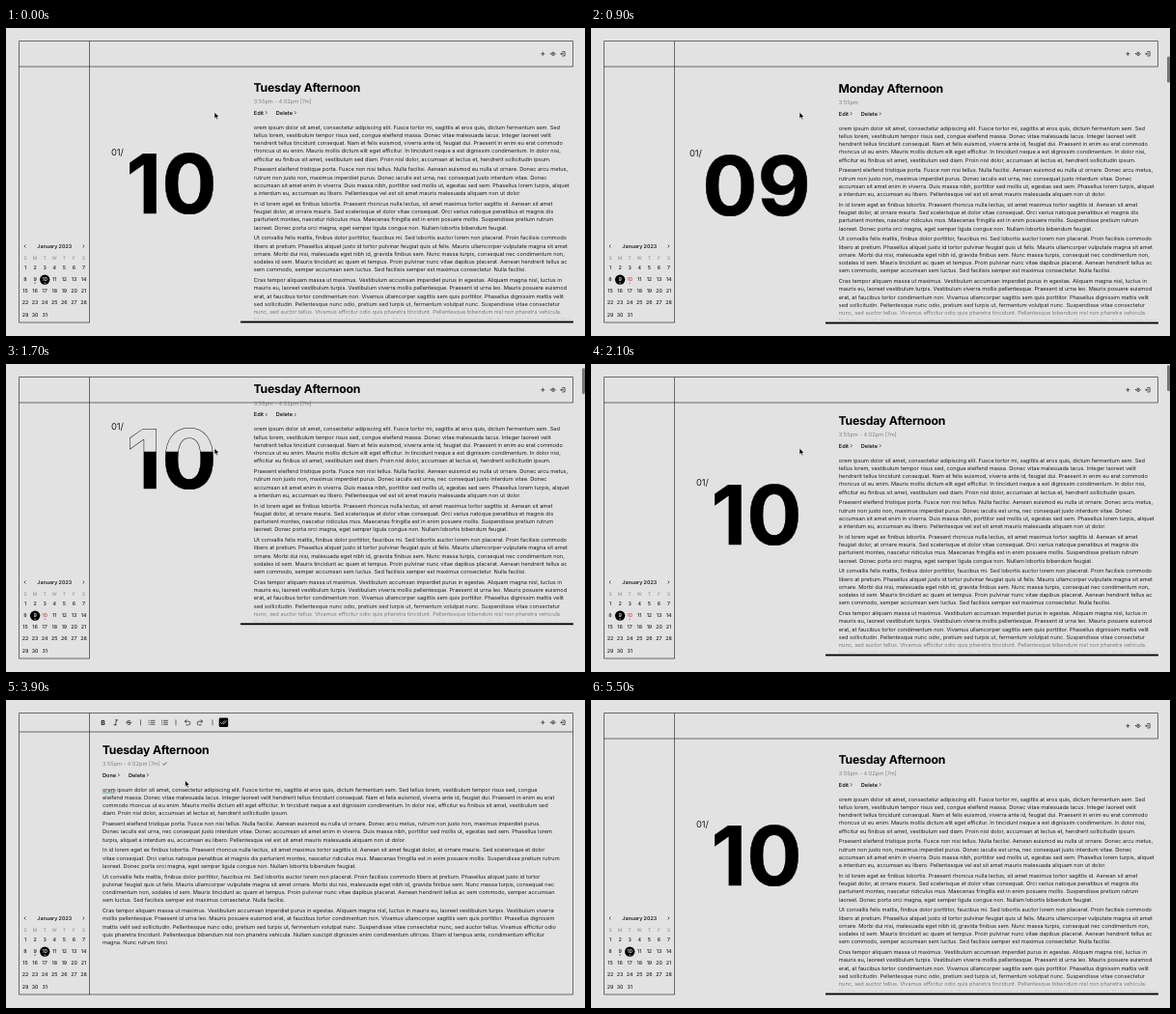
These frames come from a looping animation (600x319 px, 6.2 s). An HTML page:

```html
<!DOCTYPE html>
<html lang="en">
<head>
<meta charset="utf-8">
<title>Journal</title>
<style>
  html, body { margin: 0; width: 100%; height: 100%; overflow: hidden; background: #e2e2e2; }
  svg { display: block; width: 100%; height: 100%; }
  text { font-family: Inter, "Liberation Sans", sans-serif; font-size: 5.61px; fill: #1c1c1c;
         font-optical-sizing: none; text-rendering: geometricPrecision; white-space: pre; }
  .title { font-size: 12.2px; font-weight: 700; letter-spacing: -.015em; fill: #000; }
  .meta { font-size: 5.7px; font-weight: 300; fill: #666; }
  .action { font-weight: 500; fill: #000; }
  .big { font-size: 85px; font-weight: 700; text-anchor: middle; fill: #000; }
  .big.hollow { fill: none; stroke: #111; stroke-width: .5; }
  .month { font-size: 9.4px; text-anchor: end; }
  .cal { font-size: 5.3px; font-weight: 500; text-anchor: middle; }
  .cal.head { font-size: 5.3px; font-weight: 600; }
  .cal.week { font-size: 5px; font-weight: 400; fill: #888; }
  .line { fill: none; stroke: #2a2a2a; stroke-width: .65; }
  .icon { fill: none; stroke: #111; stroke-width: .65; stroke-linecap: round; stroke-linejoin: round; }
  .pointer { fill: #000; stroke: #fff; stroke-width: .6; stroke-linejoin: round; }
</style>
</head>
<body>
<svg id="stage" viewBox="0 0 600 319" xmlns="http://www.w3.org/2000/svg">
  <defs>
    <linearGradient id="fade" x2="0" y2="1">
      <stop offset="0" stop-color="#e2e2e2" stop-opacity="0"/>
      <stop offset="1" stop-color="#e2e2e2"/>
    </linearGradient>
  </defs>
  <g id="reader"><g id="feed"></g></g>
  <g id="editor"></g>
  <g id="frame">
    <path class="line" d="M13.5 305V13.5H587.5V33M86.5 13.5V305M13.5 305H87"/>
    <path class="line" id="rule"/>
  </g>
  <path class="line" id="box" d="M587.5 33V305H86.5"/>
  <g id="menu">
    <path class="icon" d="M554.6 0h3.4M556.3 -1.7v3.4"/>
    <path class="icon" d="M564.6 0q2.4 -3.6 4.8 0q-2.4 3.6 -4.8 0z"/>
    <circle cx="567" r=".8"/>
    <path class="icon" d="M576.7 -2.2h2.4v4.4h-2.4M577.8 0h-2.8m1 -1l-1 1l1 1"/>
  </g>
  <g id="calendar"></g>
  <rect id="thumb" x="597" width="3" height="27" rx="1.4" fill="#777"/>
  <path id="arrow" class="pointer" d="M0 0v6.6l1.6 -1.4l1.1 2.4l1.2 -.6l-1.1 -2.3h2.1z"/>
  <path id="hand" d="M-1.2 3V-.6q.6 -.9 1.2 0V1.6l2.2 .5q1 .3 .9 1.4l-.5 2.6h-3.2l-2.2 -2.6q.3 -1 1.6 -.2z"
        fill="#fff" stroke="#111" stroke-width=".7"/>
  <path id="beam" class="line" d="M-1.3 -3.4q1.3 0 1.3 .8v5.2q0 .8 -1.3 .8M1.3 -3.4q-1.3 0 -1.3 .8M0 2.6q0 .8 1.3 .8"/>
</svg>
<script>
const LOOP = 6200, STEP = 100, PAGE = 319, PARALLAX = 1.8;
const LEADING = 8.25, PAR_GAP = 2.5;
const $ = id => document.getElementById(id);

// "|" breaks a line in the reader, "/" in the wider editor.
const story = [
  "orem ipsum dolor sit amet, consectetur adipiscing elit. Fusce tortor mi, sagittis at eros quis, dictum fermentum sem. Sed|tellus lorem, vestibulum tempor risus sed, congue/eleifend massa. Donec vitae malesuada lacus. Integer laoreet velit|hendrerit tellus tincidunt consequat. Nam et felis euismod, viverra ante id, feugiat dui. Praesent in enim eu erat/commodo|rhoncus ut eu enim. Mauris mollis dictum elit eget efficitur. In tincidunt neque a est dignissim condimentum. In dolor nisi,|efficitur eu finibus sit amet, vestibulum sed/diam. Proin nisl dolor, accumsan at lectus et, hendrerit sollicitudin ipsum.",
  "Praesent eleifend tristique porta. Fusce non nisi tellus. Nulla facilisi. Aenean euismod eu nulla ut ornare. Donec arcu metus,|rutrum non justo non, maximus imperdiet purus./Donec iaculis est urna, nec consequat justo interdum vitae. Donec|accumsan sit amet enim in viverra. Duis massa nibh, porttitor sed mollis ut, egestas sed sem. Phasellus lorem/turpis, aliquet|a interdum eu, accumsan eu libero. Pellentesque vel est sit amet mauris malesuada aliquam non ut dolor.",
  "In id lorem eget ex finibus lobortis. Praesent rhoncus nulla lectus, sit amet maximus tortor sagittis id. Aenean sit amet|feugiat dolor, at ornare mauris. Sed scelerisque et dolor/vitae consequat. Orci varius natoque penatibus et magnis dis|parturient montes, nascetur ridiculus mus. Maecenas fringilla est in enim posuere mollis. Suspendisse pretium rutrum|/laoreet. Donec porta orci magna, eget semper ligula congue non. Nullam lobortis bibendum feugiat.",
  "Ut convallis felis mattis, finibus dolor porttitor, faucibus mi. Sed lobortis auctor lorem non placerat. Proin facilisis commodo|libero at pretium. Phasellus aliquet justo id tortor/pulvinar feugiat quis ut felis. Mauris ullamcorper vulputate magna sit amet|ornare. Morbi dui nisi, malesuada eget nibh id, gravida finibus sem. Nunc massa turpis, consequat nec/condimentum non,|sodales id sem. Mauris tincidunt ac quam et tempus. Proin pulvinar nunc vitae dapibus placerat. Aenean hendrerit tellus ac|sem commodo, semper accumsan/sem luctus. Sed facilisis semper est maximus consectetur. Nulla facilisi.",
  "Cras tempor aliquam massa ut maximus. Vestibulum accumsan imperdiet purus in egestas. Aliquam magna nisl, luctus in|mauris eu, laoreet vestibulum turpis. Vestibulum viverra/mollis pellentesque. Praesent id urna leo. Mauris posuere euismod|erat, at faucibus tortor condimentum non. Vivamus ullamcorper sagittis sem quis porttitor. Phasellus dignissim/mattis velit|sed sollicitudin. Pellentesque nunc odio, pretium sed turpis ut, fermentum volutpat nunc. Suspendisse vitae consectetur|nunc, sed auctor tellus. Vivamus efficitur odio/quis pharetra tincidunt. Pellentesque bibendum nisl non pharetra vehicula.|Nullam suscipit dignissim enim condimentum ultrices. Etiam id tempus ante, condimentum efficitur/magna. Nunc rutrum tinci"
];

function add(parent, tag, attrs, content) {
  const el = document.createElementNS("http://www.w3.org/2000/svg", tag);
  for (const k in attrs) el.setAttribute(k, attrs[k]);
  if (content !== undefined) el.textContent = content;
  return parent.appendChild(el);
}
const label = (parent, x, y, cls, s) => add(parent, "text", { x, y, class: cls }, s);
const icon = (parent, d) => add(parent, "path", { class: "icon", d });

function body(parent, x, y, mark) {
  const other = mark === "|" ? /\//g : /\|/g;
  for (const par of story) {
    const lines = par.replace(other, " ").split(mark);
    lines.forEach((s, i) => label(parent, x, y + i * LEADING, "", s.trim()));
    y += lines.length * LEADING + PAR_GAP;
  }
}

function heading(parent, x, y, title, meta, action, gap) {
  label(parent, x - .3, y + .2, "title", title);
  label(parent, x, y + 12.8, "meta", meta);
  label(parent, x, y + 24.4, "action", action);
  label(parent, x + gap + 10, y + 24.4, "action", "Delete");
  for (const cx of [gap, gap + 30])
    icon(parent, `M${x + cx - .6} ${y + 21.2}l1.2 1.2l-1.2 1.2`);
}

function entry(i, day, title, meta, labelX) {
  const g = add($("feed"), "g", { transform: `translate(0 ${i * PAGE})` });
  heading(g, 256.8, 65.3, title, meta, "Edit", 13);
  const clip = add(add($("stage"), "clipPath", { id: "page" + i }), "rect", { x: 243, y: 0, width: 357, height: 304 });
  body(add(g, "g", { "clip-path": `url(#page${i})` }), 256.8, 104.7, "|");
  add(g, "rect", { x: 243, y: 286, width: 345, height: 18, fill: "url(#fade)" });
  add(g, "rect", { x: 243, y: 303.6, width: 345, height: 1.8 });

  const num = add($("reader"), "g", {});
  const mask = add(add(num, "clipPath", { id: "ink" + i }), "rect", { x: 90, width: 160 });
  label(num, labelX, 131.6, "month", "01/");
  label(num, 171.5, 192, "big hollow", day);
  add(num, "text", { x: 171.5, y: 192, class: "big", "clip-path": `url(#ink${i})` }, day);

  return scroll => {
    const d = scroll - i * PAGE;
    num.setAttribute("transform", `translate(0 ${-PARALLAX * d})`);
    const top = d > 11 ? 130 + d - 11 : 120;
    const bottom = d < -6 ? 192 + d + 6 : 200;
    mask.setAttribute("y", top);
    mask.setAttribute("height", Math.max(0, bottom - top));
  };
}

const entries = [
  entry(0, "10", "Tuesday Afternoon", "3:55pm - 4:02pm [7m]", 122),
  entry(1, "09", "Monday Afternoon", "3:55pm", 115)
];

function buildEditor() {
  const g = $("editor"), y = 23.3;
  heading(g, 100, 55.3, "Tuesday Afternoon", "3:55pm - 4:02pm [7m]", "Done", 17);
  icon(g, "M162.6 66.2l1.2 1.2l2.4 -2.7");
  body(g, 100, 94.7, "/");
  add(g, "path", { id: "underline", d: "M100 96h13.6", stroke: "#2f7a48", "stroke-width": .6 });

  add(g, "text", { x: 98.2, y: y + 2.6, style: "font-size:7px;font-weight:700" }, "B");
  icon(g, `M113.4 ${y - 2.5}h2.4M112 ${y + 2.5}h2.4M114.7 ${y - 2.5}l-1.5 5`);
  add(g, "text", { x: 125, y: y + 2.6, style: "font-size:7px" }, "S");
  icon(g, `M124.4 ${y}h5.6`);
  for (const x of [139.5, 176, 214])
    add(g, "path", { class: "line", d: `M${x} ${y - 3}v6` });
  for (const x of [148, 161.5])
    for (const dy of [-2, 0, 2])
      icon(g, `M${x} ${y + dy}h.3M${x + 2} ${y + dy}h4`);
  const turn = (x, s) => icon(g, `M${x - s} ${y - 2.8}l${-1.6 * s} 1.6l${1.6 * s} 1.6M${x - 2.6 * s} ${y - 1.2}h${3.6 * s}a1.9 1.9 0 0 ${s > 0 ? 1 : 0} 0 3.8h${-2.4 * s}`);
  turn(188, 1);
  turn(201, -1);
  add(g, "rect", { x: 220.7, y: y - 4.7, width: 9.5, height: 9.5, rx: 1.4 });
  icon(g, `M222.3 ${y}l1.4 1.4l2.8 -3M225.2 ${y + 1}l.5 .4l2.8 -3`).style.stroke = "#fff";
}
buildEditor();

const days = [];
function buildCalendar() {
  const g = $("calendar"), colX = i => 20 + 10.1 * i;
  icon(g, "M20.1 224.8l-1.1 1.2l1.1 1.2M80 224.8l1.1 1.2l-1.1 1.2");
  label(g, 50.2, 227.9, "cal head", "January 2023");
  [..."SMTWTFS"].forEach((c, i) => label(g, colX(i), 239.9, "cal week", c));
  const disc = add(g, "circle", { r: 5.2, cy: 260.6 });
  for (let n = 1; n <= 31; n++) {
    const x = colX((n - 1) % 7), y = 248 + 12.15 * Math.floor((n - 1) / 7);
    days[n] = [label(g, x, y + 1.9, "cal", n)];
    if (n === 9 || n === 10) days[n].push(add(g, "circle", { cx: x, cy: y + 3.9, r: .6 }));
  }
  const paint = (n, color) => days[n].forEach(el => el.style.fill = color);
  return picked => {
    disc.setAttribute("cx", colX(picked - 8));
    paint(9, picked === 9 ? "#fff" : "#111");
    paint(10, picked === 10 ? "#fff" : "#d33a2c");
  };
}
const pick = buildCalendar();

// Linear interpolation through [time, value...] keys.
function track(keys, t, col = 1) {
  let i = keys.findIndex(k => k[0] > t);
  if (i < 0) return keys[keys.length - 1][col];
  if (i === 0) return keys[0][col];
  const a = keys[i - 1], b = keys[i];
  return a[col] + (b[col] - a[col]) * (t - a[0]) / (b[0] - a[0]);
}

const scrollKeys = [[0, 0], [100, 18], [200, 85], [300, 170], [400, 237], [500, 277], [600, 299], [700, 310],
  [900, 318], [1000, 319], [1100, 318], [1200, 312], [1300, 289.6], [1400, 205], [1500, 130], [1600, 72],
  [1700, 35.2], [1800, 19], [1900, 10], [2000, 5], [2200, 1], [2400, 0]];
const pointerKeys = [[0, 216, 87.3], [2300, 216, 87.3], [2500, 230, 88.5], [2700, 257, 90], [2800, 262, 90.5],
  [3300, 262, 90.5], [3400, 260, 89.5], [3600, 260, 89.5], [3700, 245, 88.5], [3900, 185.5, 83.3],
  [4300, 160, 84], [4700, 112, 78], [5300, 112, 78], [5400, 139, 60]];
const editKeys = [[3200, 0], [3300, .35], [3400, .75], [3500, 1], [4900, 1], [5000, .65], [5100, .25], [5200, 0]];
const thumbKeys = [[0, 0], [100, 1], [2800, 1], [3000, 0]];

function pointerShape(t) {
  if (t >= 5500) return "";
  if ((t >= 2800 && t < 3400) || (t >= 4700 && t < 5400)) return "hand";
  return t >= 3400 && t < 3800 ? "beam" : "arrow";
}

function draw(t) {
  const scroll = track(scrollKeys, t), edit = track(editKeys, t);
  $("feed").setAttribute("transform", `translate(0 ${-scroll})`);
  entries.forEach(update => update(scroll));
  pick(t >= 900 && t < 2400 ? 9 : 10);

  $("reader").style.opacity = 1 - edit;
  $("editor").style.opacity = $("box").style.opacity = edit;
  $("underline").style.opacity = t >= 3700 ? 1 : 0;
  const base = 40 - 7 * edit;
  $("rule").setAttribute("d", `M13.5 ${base}H587.5V33`);
  $("menu").setAttribute("transform", `translate(0 ${(13.5 + base) / 2})`);

  $("thumb").setAttribute("y", 1 + scroll * .09);
  $("thumb").style.opacity = track(thumbKeys, t);

  const shape = pointerShape(t);
  for (const id of ["arrow", "hand", "beam"]) {
    $(id).style.display = id === shape ? "" : "none";
    $(id).setAttribute("transform", `translate(${track(pointerKeys, t)} ${track(pointerKeys, t, 2)})`);
  }
}

const start = performance.now();
function tick() {
  const t = (performance.now() - start) % LOOP;
  draw(Math.floor(t / STEP) * STEP);
  requestAnimationFrame(tick);
}
tick();
</script>
</body>
</html>
```
